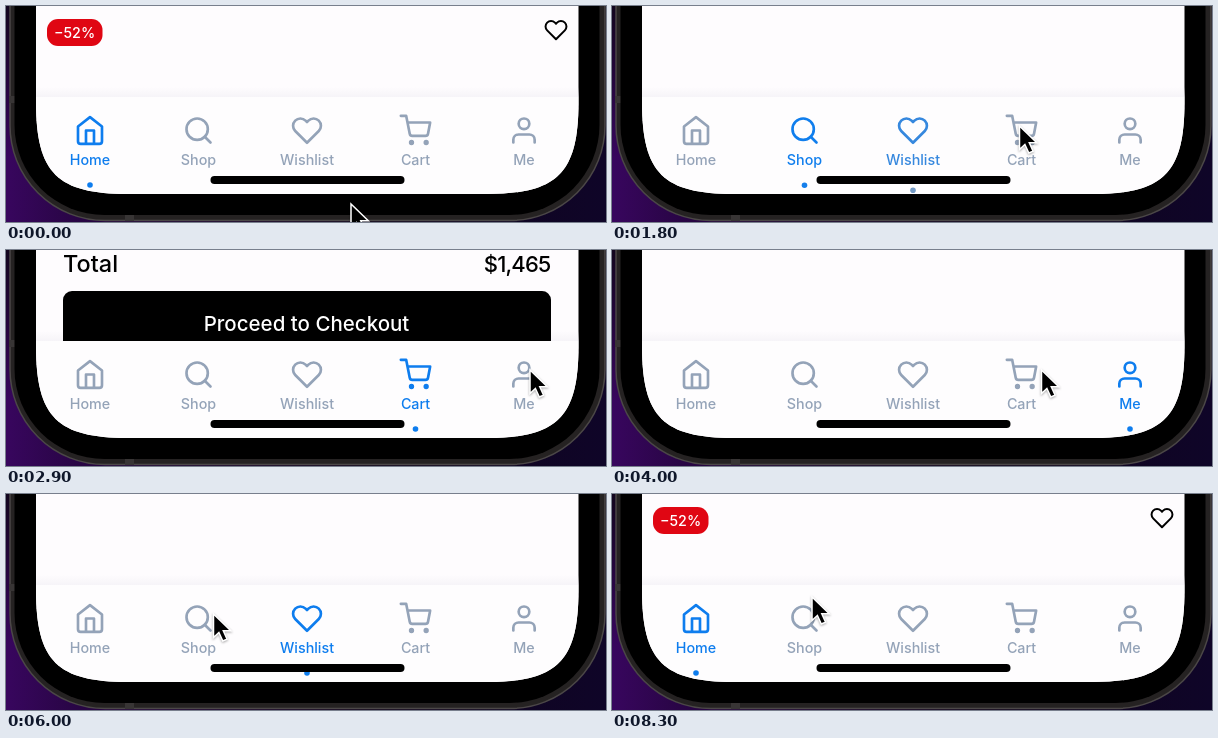
Recreate the animation shown at these times as an HTML page. Size 600 by 216 pixels, loop 8400 ms.

```html
<!DOCTYPE html>
<html lang="en">
<head>
<meta charset="utf-8">
<style>
  html, body { margin: 0; width: 100%; height: 100%; overflow: hidden; background: #14061f; }
  svg { display: block; width: 600px; height: 216px; font: 500 14.3px Inter, "Open Sans", sans-serif; }
  .icon { fill: none; stroke-width: 2; stroke-linecap: round; stroke-linejoin: round; }
</style>
</head>
<body>
<svg viewBox="0 0 600 216">
  <defs>
    <linearGradient id="wall" x2="1">
      <stop stop-color="#38065e"/><stop offset=".12" stop-color="#280544"/>
      <stop offset=".6" stop-color="#10041b"/><stop offset="1" stop-color="#0f0528"/>
    </linearGradient>
    <linearGradient id="dusk" x2="0" y2="1">
      <stop stop-color="#0d0614" stop-opacity=".85"/><stop offset=".7" stop-color="#0d0614" stop-opacity="0"/>
    </linearGradient>
    <linearGradient id="shade" x2="0" y2="1">
      <stop stop-color="#f6f4f8" stop-opacity="0"/><stop offset="1" stop-color="#f6f4f8"/>
    </linearGradient>
    <clipPath id="screen">
      <path d="M30 0V96C30 167 51 188 122 188H480.5C551.5 188 572.5 167 572.5 96V0Z"/>
    </clipPath>
    <clipPath id="page"><rect x="30" width="543" height="91"/></clipPath>
  </defs>

  <rect width="600" height="216" fill="url(#wall)"/>
  <rect width="600" height="216" fill="url(#dusk)"/>
  <rect x="4" y="-200" width="595" height="414.5" rx="95" fill="#252222" stroke="#4b4747" stroke-width="1.5"/>
  <path d="M3 90h6v7h-6zM119 208h9v7h-9z" fill="#383535"/>
  <rect x="8.5" y="-200" width="585" height="409" rx="90"/>

  <g clip-path="url(#screen)">
    <rect x="30" width="543" height="188" fill="#fefcfe"/>
    <rect x="30" y="81" width="543" height="10" fill="url(#shade)"/>
    <g clip-path="url(#page)">
      <g id="homePage">
        <rect x="41" y="13" width="55.5" height="27" rx="11" fill="#e00613"/>
        <text x="68.5" y="31.5" fill="#fff" text-anchor="middle">−52%</text>
        <g id="favorite" class="icon" stroke="#000" transform="translate(538 12)"></g>
      </g>
      <g id="cartPage">
        <text x="57" y="21.5" font-size="23.5">Total</text>
        <text x="544.5" y="21.5" font-size="22" letter-spacing="-.8" text-anchor="end">$1,465</text>
        <rect x="57" y="41" width="488" height="70" rx="9"/>
        <text x="300.5" y="80.5" font-size="20.5" fill="#fff" text-anchor="middle">Proceed to Checkout</text>
      </g>
    </g>
    <rect x="30" y="91" width="543" height="97" fill="#fefdfe"/>
    <g id="nav"></g>
    <rect x="204.5" y="170" width="194" height="8" rx="4"/>
  </g>
  <path id="cursor" d="M0 0V23.5L5.4 18.4L9.3 27L13.6 25.1L9.8 16.8H17.3Z" stroke="#fff" stroke-width="1.5"
    style="filter: drop-shadow(0 1px 1px #0005)"/>
</svg>

<script>
const LOOP = 8400, FLIGHT = 450;
const HEART = '<path d="M20.84 4.61a5.5 5.5 0 0 0-7.78 0L12 5.67l-1.06-1.06a5.5 5.5 0 0 0-7.78 7.78L12 21.23l8.84-8.84a5.5 5.5 0 0 0 0-7.78z"/>';
const tabs = [
  ['Home', '<path d="m3 9 9-7 9 7v11a2 2 0 0 1-2 2H5a2 2 0 0 1-2-2zM9 22V12h6v10"/>'],
  ['Shop', '<circle cx="11" cy="11" r="8"/><path d="m21 21-4.35-4.35"/>'],
  ['Wishlist', HEART],
  ['Cart', '<circle cx="9" cy="21" r="1"/><circle cx="20" cy="21" r="1"/><path d="M1 1h4l2.68 13.39a2 2 0 0 0 2 1.61h9.72a2 2 0 0 0 2-1.61L23 6H6"/>'],
  ['Me', '<path d="M20 21v-2a4 4 0 0 0-4-4H8a4 4 0 0 0-4 4v2"/><circle cx="12" cy="7" r="4"/>'],
];

const $ = id => document.getElementById(id);
const clamp = v => Math.min(1, Math.max(0, v));
const smooth = v => (v = clamp(v), v * v * (3 - 2 * v));
const easeOut = v => 1 - (1 - clamp(v)) ** 2;
const lerp = (a, b, k) => a + (b - a) * k;
const GREY = [148, 163, 184], BLUE = [14, 125, 238];
const tint = k => `rgb(${GREY.map((c, i) => lerp(c, BLUE[i], k))})`;
const tabX = i => 84 + i * 108.5;

// Tabs are pressed from Shop to Me and back to Home, at a slowing pace
const clickTime = i => 1000 + 620 * i + 44 * i * i;
const spans = [1, 2, 3, 4, 3, 2, 1, 0].map((tab, i, all) => ({
  tab, start: clickTime(i), end: i < all.length - 1 ? clickTime(i + 1) : LOOP + clickTime(0),
}));

// When the pointer reaches each tab, and how far right of its centre it rests
const arrivals = [550, 1300, 1800, 2850, 3950, 5050, 5800, 6900];
const offsets = [8, 6, -2, 6, 20, 8, 15, 8];
const stops = spans.map((s, i) => ({ x: tabX(s.tab) + offsets[i], y: 120, at: arrivals[i], arc: 0 }));
stops.push({ x: 200, y: 103, at: 8000, arc: 72 });

function pointer(t) {
  let x = 345, y = 198;
  stops.forEach((stop, i) => {
    const start = Math.max(i ? spans[i - 1].start : 0, stop.at - FLIGHT);
    const k = smooth((t - start) / (stop.at - start));
    x = lerp(x, stop.x, k);
    y = lerp(y, stop.y, k) - stop.arc * Math.sin(Math.PI * k);
  });
  return [x, y];
}

// Strongest value of a span function for a tab, also across the loop seam
const strongest = (tab, t, f) => Math.max(...spans.filter(s => s.tab === tab)
  .flatMap(s => [f(t, s), f(t + LOOP, s)]));
const active = (t, s) => easeOut((t - s.start) / 300) * (1 - smooth((t - s.end - 120) / 250));
const shown = (t, s) => clamp((t - s.start - 20) / 80) * (1 - clamp((t - s.end - 20) / 80));

$('favorite').innerHTML = HEART;
$('nav').innerHTML = tabs.map(([name, icon], i) => `<g transform="translate(${tabX(i)})">
  <g class="icon" transform="translate(-16 108.5) scale(1.333)">${icon}</g>
  <text y="159" text-anchor="middle">${name}</text><circle r="2.8"/></g>`).join('');
const items = [...$('nav').children];

function draw() {
  const t = performance.now() % LOOP;
  items.forEach((item, i) => {
    const k = strongest(i, t, active);
    const [icon, label, dot] = item.children;
    icon.setAttribute('stroke', tint(k));
    label.setAttribute('fill', tint(k));
    dot.setAttribute('cy', 179 + 18 * (1 - k));
    dot.setAttribute('fill', tint(k ** 4));
  });
  $('homePage').setAttribute('opacity', strongest(0, t, shown));
  $('cartPage').setAttribute('opacity', strongest(3, t, shown));
  $('cursor').setAttribute('transform', `translate(${pointer(t)})`);
  requestAnimationFrame(draw);
}
draw();
</script>
</body>
</html>
```
